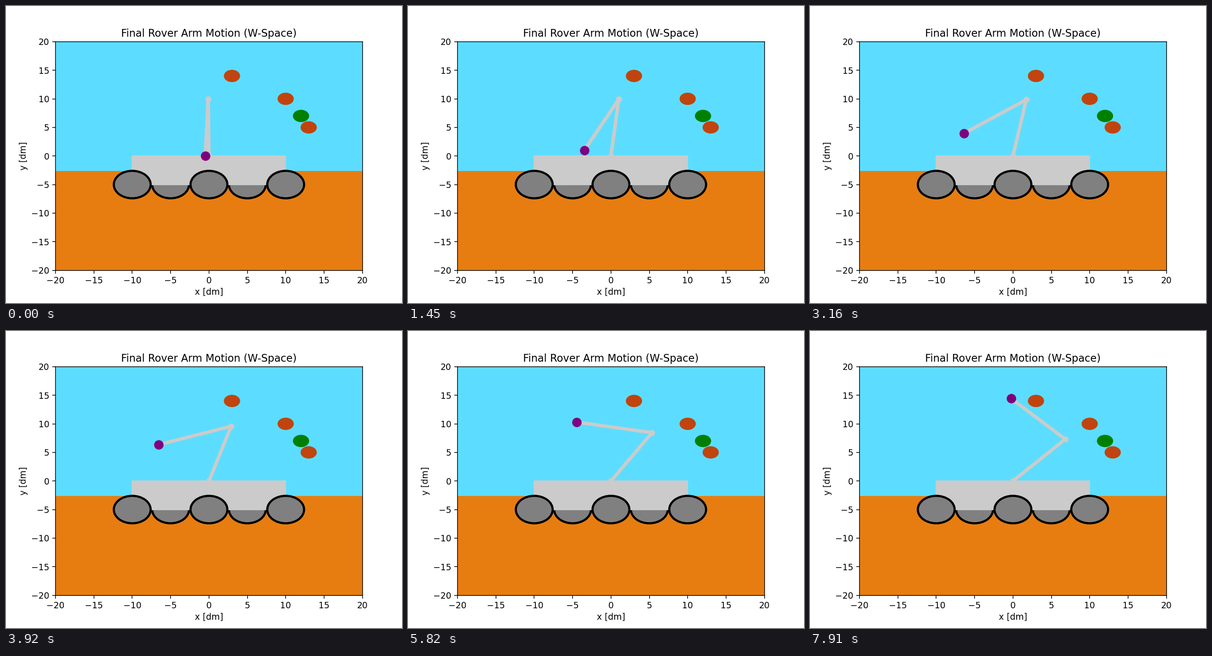
A matplotlib script for the animation above (8 s loop, 864 px wide and 648 px high).

```python
import numpy as np
import matplotlib.pyplot as plt
from matplotlib.animation import FuncAnimation
from matplotlib.patches import Circle, Rectangle

LOOP, TICK = 8000, 20
LINK = 10
SKY, GROUND, ROCK, METAL = "#5cddff", "#e77d11", "#c1440e", "#cbcbcb"

# via points of the arm: step, shoulder angle, elbow angle (degrees)
VIA = [(0, 90.6, 177.3), (9, 84.2, 167.2), (16, 84.1, 159.2),
       (34, 80, 136), (45, 70.6, 121.7), (51, 70.7, 118.8),
       (62, 57.6, 111.7), (72, 48.5, 102.7), (84, 47, 87.8)]


def step_at(ms):
    """Path step on show: steps last 60 and 130 ms in turn."""
    if ms < 60:
        return 0
    pairs, rest = divmod(ms - 60, 190)
    return 1 + 2 * pairs + (rest >= 60)


def arm_pose(step):
    steps, shoulder, elbow = zip(*VIA)
    a = np.radians(np.interp(step, steps, shoulder))
    b = a + np.radians(np.interp(step, steps, elbow))
    x = np.cumsum([0, LINK * np.cos(a), LINK * np.cos(b)])
    y = np.cumsum([0, LINK * np.sin(a), LINK * np.sin(b)])
    return x, y


fig, ax = plt.subplots(figsize=(6.4, 4.8), dpi=135)
ax.set(xlim=(-20, 20), ylim=(-20, 20), ylabel="y [dm]",
       title="Final Rover Arm Motion (W-Space)")
ax.set_xlabel("x [dm]", labelpad=3.2)


def block(x, y, w, h, color):
    ax.add_patch(Rectangle((x, y), w, h, color=color))


def ball(x, y, color):
    ax.add_patch(Circle((x, y), 1, color=color))


def wheel(x):
    ax.add_patch(Circle((x, -5), 2.4, fc="gray", ec="black", lw=2.5))


block(-20, -20, 40, 20, GROUND)
block(-20, -2.56, 40, 22.56, SKY)
for x in (-5, 5):
    wheel(x)
block(-10, -5, 20, 5, METAL)
for x in (-10, 0, 10):
    wheel(x)
for x, y in ((3, 14), (10, 10), (13, 5)):
    ball(x, y, ROCK)
ball(12, 7, "green")

arm, = ax.plot([], [], "o-", color=METAL, lw=4)
hand, = ax.plot([], [], "o", color="purple", ms=10)


def draw(i):
    x, y = arm_pose(step_at(i * TICK + TICK // 2))
    arm.set_data(x, y)
    hand.set_data(x[2:], y[2:])
    return arm, hand


anim = FuncAnimation(fig, draw, frames=LOOP // TICK, interval=TICK,
                     repeat=True, repeat_delay=0)
plt.show()
```
